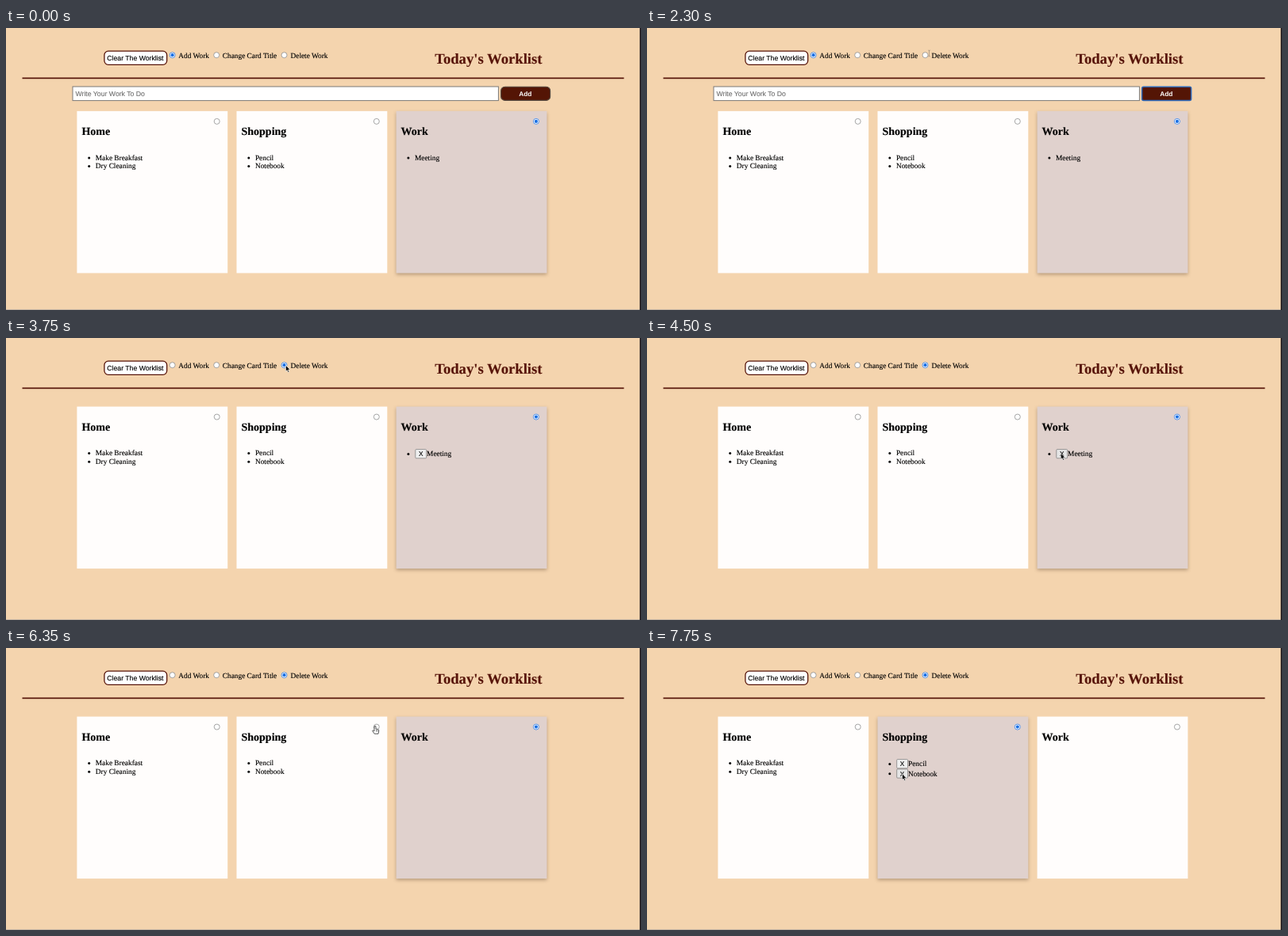
An HTML page that plays this animation: 800 by 356 pixels, repeating every 8 s.

```html
<!DOCTYPE html>
<html lang="en">
<head>
<meta charset="utf-8">
<title>Worklist</title>
<style>
  html, body { margin: 0; width: 100%; height: 100%; overflow: hidden; background: #f4d4ae; }
  svg { display: block; width: 800px; height: 356px; }
  text { font: 9.33px "Liberation Serif", Times, serif; text-rendering: geometricPrecision; white-space: pre;
    stroke: #000; stroke-width: .14px; }
  .h1 { font-size: 18.67px; font-weight: bold; fill: #571409; stroke: #571409; }
  .h2 { font-size: 14px; font-weight: bold; }
  .ui { font: 8.7px "Liberation Sans", Arial, sans-serif; }
  .hint { fill: #707070; stroke: #707070; }
  .add { font: bold 8.3px "Liberation Sans", Arial, sans-serif; fill: #fff; stroke: none; text-anchor: middle; }
  .x { font: 8.2px "Liberation Sans", Arial, sans-serif; text-anchor: middle; }
  .selected { filter: drop-shadow(0 2px 2px rgba(60, 35, 15, .32)); }
</style>
</head>
<body>
<svg id="stage" viewBox="0 0 800 356"></svg>
<script>
const LOOP = 8000, STEP = 50;
const DELETE_MODE = 3000, PRESS = 4750, REMOVED = 4800, PICK = 6400;
const stage = document.getElementById('stage');

// Pointer keys: time, x, y
const path = [
  [1150, 655, 84], [1450, 545, 36], [1700, 440, 16], [1950, 364, 34],
  [2100, 364, 34], [2300, 355.5, 32], [2450, 355.5, 32], [2650, 352.5, 34.5],
  [3750, 352.5, 34.5], [4500, 521.3, 145.5], [5400, 521.3, 145.5],
  [5750, 479, 111], [5900, 479, 111], [6050, 468, 101], [6200, 465, 98.3],
  [6950, 465, 98.3], [7750, 321.5, 158.8]
];

const rect = (x, y, w, h, fill, more = '') =>
  `<rect x="${x}" y="${y}" width="${w}" height="${h}" fill="${fill}" ${more}/>`;
const text = (x, y, s, cls = '') =>
  `<text x="${x}" y="${y}" class="${cls}">${s}</text>`;
const dot = (x, y, r, fill, more = '') =>
  `<circle cx="${x}" cy="${y}" r="${r}" fill="${fill}" ${more}/>`;
const radio = (x, y, on) =>
  dot(x, y, 3.5, '#fff', `stroke="${on ? '#2a7ae6' : '#808080'}" stroke-width="${on ? .8 : .7}"`) +
  (on ? dot(x, y, 2.1, '#1a70e4') : '');

function pointerAt(t) {
  if (t < path[0][0]) return null;
  const i = path.findIndex(k => k[0] > t);
  if (i < 0) return path.at(-1).slice(1);
  const [t0, x0, y0] = path[i - 1], [t1, x1, y1] = path[i];
  let p = (t - t0) / (t1 - t0);
  p = p * p * (3 - 2 * p);
  return [x0 + (x1 - x0) * p, y0 + (y1 - y0) * p];
}

function header(t) {
  const del = t >= DELETE_MODE;
  return rect(123.9, 29.2, 78.8, 17.1, '#fff', 'rx="5" stroke="#571409" stroke-width="1.3"') +
    text(127.3, 40.8, 'Clear The Worklist', 'ui') +
    radio(209.6, 34.2, !del) + text(217.3, 38, 'Add Work') +
    radio(265.2, 34.2, false) + text(272.8, 38, 'Change Card Title') +
    radio(350.5, 34.2, del) + text(358.5, 38, 'Delete Work') +
    text(540.2, 45.1, "Today's Worklist", 'h1') +
    rect(20.5, 62.5, 758, 1.7, '#571409');
}

function form(t) {
  const ring = t >= 500
    ? 'rx="2" stroke="#2b66b8" stroke-width="1.5"'
    : 'rx="5" stroke="#54483f" stroke-width="1.1"';
  return rect(84, 74, 536.4, 17.6, '#fff', 'stroke="#7d7a78" stroke-width="1"') +
    text(87.5, 86, 'Write Your Work To Do', 'ui hint') +
    rect(623.6, 74.2, 62, 17.2, '#541505', ring) +
    text(654.3, 85.9, 'Add', 'add');
}

function item(s, x, y, i, button, fill) {
  const base = y + (button ? 62.6 + 12.3 * i : 61.8 + 10.6 * i);
  return dot(x + 15.3, base - 2.8, 1.5, '#000') +
    (button ? rect(x + 24.2, base - 8.6, 13.8, 11.2, fill, 'rx="1" stroke="#767676" stroke-width=".7"') +
      text(x + 31.1, base, 'X', 'x') : '') +
    text(x + (button ? 38.5 : 23.4), base, s);
}

function card(n, title, items, y, selected, buttons, fill) {
  const x = 89.4 + 201.1 * n;
  return rect(x, y, 189.8, 204.5, selected ? '#e0d1cd' : '#fffdfc', selected ? 'class="selected"' : '') +
    radio(x + 176.3, y + 13, selected) +
    text(x + 6, y + 30.2, title, 'h2') +
    items.map((s, i) => item(s, x, y, i, buttons, fill(i))).join('');
}

function pointer(t, p) {
  if (!p) return '';
  const [x, y] = p;
  const inCard = t >= DELETE_MODE && y > 86.6 && y < 291 && (x - 89.4) % 201.1 < 189.8;
  const onWorkX = t < REMOVED && x > 515 && x < 530 && y > 140 && y < 153;
  const onShopX = t >= PICK && x > 314 && x < 329 && y > 140 && y < 165;
  const at = `transform="translate(${x.toFixed(2)} ${y.toFixed(2)})"`;
  if (inCard && !onWorkX && !onShopX)
    return `<path ${at} d="M-1 5V.7Q0-.6 1 .7V4L4 4.6Q5 5 4.7 6.6L4 10H-.8L-3.4 6.2Q-3.3 4.8-1 6.6Z
      M1.6 5.4V7M3 5.6V7" fill="#fff" stroke="#222" stroke-width=".75" stroke-linejoin="round"/>`;
  if (t >= 1900 && t < 2450)
    return `<path ${at} d="M-1.2-4Q0-4 0-3V3Q0 4-1.2 4M1.2-4Q0-4 0-3M0 3Q0 4 1.2 4"
      fill="none" stroke="#8a7c70" stroke-width=".6"/>`;
  return `<path ${at} d="M0 0V7.6L1.7 6.1L2.9 8.8L4.2 8.2L3 5.6L5.3 5.4Z"
    fill="#000" stroke="#fff" stroke-width=".6" stroke-linejoin="round"/>`;
}

function draw(t) {
  const del = t >= DELETE_MODE, shop = t >= PICK;
  const y = del ? 86.6 : 104.9;
  const plain = () => '#efefef';
  const workFill = () => t >= PRESS ? '#f5f5f5' : t >= 4400 ? '#e5e5e5' : '#efefef';
  const shopFill = i => t >= 7650 && i === 1 ? '#e5e5e5' : '#efefef';
  stage.innerHTML = rect(0, 0, 800, 356, '#f4d4ae') +
    header(t) + (del ? '' : form(t)) +
    card(0, 'Home', ['Make Breakfast', 'Dry Cleaning'], y, false, false, plain) +
    card(1, 'Shopping', ['Pencil', 'Notebook'], y, shop, shop, shopFill) +
    card(2, 'Work', t < REMOVED ? ['Meeting'] : [], y, !shop, del, workFill) +
    rect(0, 355.2, 800, .8, '#b9aea2') + rect(798.5, 0, 1.5, 356, '#100c14') +
    pointer(t, pointerAt(t));
}

let last = -1;
function tick() {
  const t = Math.floor(performance.now() % LOOP / STEP) * STEP;
  if (t !== last) draw(last = t);
  requestAnimationFrame(tick);
}
tick();
</script>
</body>
</html>
```
